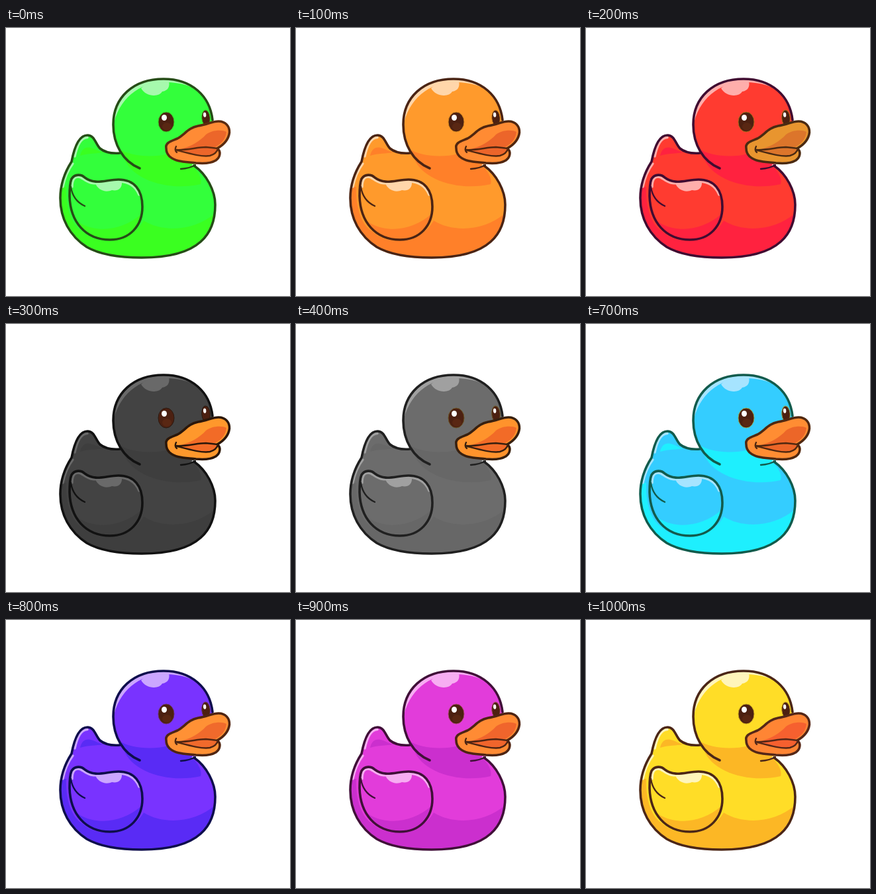
Animation of 429x405 px, one loop 1.1 s. Source, as an HTML page without scripts:

```html
<!DOCTYPE html>
<html lang="en">
<head>
<meta charset="utf-8">
<title>Colour-changing duck</title>
<style>
html, body { margin: 0; width: 100%; height: 100%; overflow: hidden; background: #fff; }
svg { display: block; width: 429px; height: 405px; animation: dye 1.1s step-end infinite; }

/* main, shade, gloss, outline; beak, mouth, beak outline; eye fringe */
@keyframes dye {
  0%     { --main: #33ff3b; --shade: #3aff20; --gloss: #a6f9ad; --line: #264c17; --beak: #ff8b35; --mouth: #ec662a; --lip: #5a2b10; --fringe: #3cc425; }
  9.09%  { --main: #ff9a2c; --shade: #ff8029; --gloss: #ffd6aa; --line: #4a2414; --beak: #ff8b33; --mouth: #ec652a; --lip: #50260f; --fringe: #d88a20; }
  18.18% { --main: #ff3b30; --shade: #ff223f; --gloss: #ffaeab; --line: #400c31; --beak: #e8952f; --mouth: #dc752b; --lip: #4a2a12; --fringe: #a86c18; }
  27.27% { --main: #434343; --shade: #3e3e3e; --gloss: #696969; --line: #121212; --beak: #ff982c; --mouth: #f26b27; --lip: #2b170a; --fringe: #2b1a10; }
  36.36% { --main: #6c6c6c; --shade: #676767; --gloss: #a0a0a0; --line: #202020; --beak: #ff932c; --mouth: #f26b27; --lip: #38200f; --fringe: #6b5426; }
  45.45% { --main: #999; --shade: #929292; --gloss: #d9d9d9; --line: #2e2e2e; --beak: #ff8f2b; --mouth: #f26b27; --lip: #482410; --fringe: #b89436; }
  54.54% { --main: #62b4cc; --shade: #58bec9; --gloss: #bcdfec; --line: #1f443e; --beak: #ff8f2f; --mouth: #f06827; --lip: #4c2610; --fringe: #a69a46; }
  63.63% { --main: #34cdff; --shade: #1eeffe; --gloss: #a6e4ff; --line: #125b4c; --beak: #ff8d33; --mouth: #ec6628; --lip: #502810; --fringe: #98a249; }
  72.72% { --main: #7933ff; --shade: #592bf5; --gloss: #cba6ff; --line: #0e0e4c; --beak: #ff9135; --mouth: #f06a2c; --lip: #4f2512; --fringe: #67345f; }
  81.81% { --main: #e23cda; --shade: #cb2fce; --gloss: #f7adf2; --line: #401038; --beak: #ff8b34; --mouth: #f0652c; --lip: #4d2413; --fringe: #b04a70; }
  90.9%  { --main: #ffdd27; --shade: #fcb725; --gloss: #fff5bb; --line: #4b2617; --beak: #ff8534; --mouth: #f6602f; --lip: #542718; --fringe: #c6a221; }
}

.main { fill: var(--main); }
.shade { fill: var(--shade); }
.gloss { fill: var(--gloss); }
.line, .rim, .crease { fill: none; stroke-linecap: round; stroke-linejoin: round; }
.line { stroke: var(--line); stroke-width: 3.6; }
.crease { stroke: var(--line); stroke-width: 2.3; }
.rim { stroke: var(--gloss); stroke-width: 3.4; }
.beak { fill: var(--beak); stroke: var(--lip); stroke-width: 3.6; stroke-linejoin: round; }
.mouth { fill: var(--mouth); }
.lip { fill: none; stroke: var(--lip); stroke-width: 2.4; stroke-linecap: round; stroke-linejoin: round; }
.eye { fill: #4c2011; stroke: var(--fringe); stroke-width: 1; }
.iris { fill: #592713; }
.glint { fill: #fff; }
</style>
</head>
<body>
<svg viewBox="0 0 429 405" role="img" aria-label="Rubber duck changing colour">
  <defs>
    <path id="body" d="M172 189C159 190 148 187 142 182C135 175 134 162 123 162C110 162 103 181 99 202C90 216 82 233 82 257C82 288 96 314 122 331C143 343 174 347 205 347C241 347 274 341 294 323C309 310 316 290 316 267C316 246 303 221 284 208"/>
    <path id="head" d="M202 212C177 202 162 176 162 146C162 105 192 77 238 77C281 77 308 103 312 139"/>
    <path id="wing" d="M119 226C114 221 104 220 99 228C96 235 96 244 96 254C97 293 120 320 157 320C187 320 206 299 206 270C206 245 194 229 170 229C151 229 135 238 119 226Z"/>
    <clipPath id="inBody"><use href="#body"/></clipPath>
    <clipPath id="inWing"><use href="#wing"/></clipPath>
  </defs>

  <use href="#body" class="main"/>
  <g clip-path="url(#inBody)" class="shade">
    <path d="M80 240H91C90 270 98 298 116 308C140 330 188 326 208 291C236 309 286 308 318 278V350H80Z"/>
    <path d="M178 196C190 230 246 247 294 236C297 226 288 214 278 205Z"/>
    <path d="M112 193C114 183 120 179 128 181C136 183 141 187 147 188C136 190 125 189 112 193Z"/>
  </g>
  <path class="rim" d="M104 194C107 180 113 165.500 123 165.500M86 240C89 225 95 213 101 205"/>
  <use href="#body" class="line"/>

  <path class="main" d="M202 212C177 202 162 176 162 146C162 105 192 77 238 77C281 77 308 103 312 139L316 170L284 206L250 200Z"/>
  <path class="shade" d="M171 183C188 193 218 197 246 190L286 204L270 213H202C188 206 178 196 171 183Z"/>
  <path class="gloss" d="M162 148C162 105 192 77 238 77C265 77 285 86 297 100C283 88 265 82 240 82C200 82 170 108 162 148Z"/>
  <path class="gloss" d="M204 91C214 81 232 78 246 81C248 89 244 95 236 96C231 105 211 104 204 91Z"/>
  <use href="#head" class="line"/>
  <path class="crease" d="M264 213Q278 212 286 207"/>

  <use href="#wing" class="main"/>
  <path class="shade" clip-path="url(#inWing)" d="M94 276C106 304 164 320 208 278V324H94Z"/>
  <path class="rim" d="M100 240C100 230 103 225 109 225C115 225 119 232 128 234C144 237 156 232 170 232C186 232 196 240 201 252"/>
  <path class="gloss" d="M134 233C148 236 159 231 175 232C176 243 168 247 160 245C151 249 139 246 134 233Z"/>
  <use href="#wing" class="line"/>
  <path class="crease" d="M98 240C100 254 108 264 119 269"/>

  <ellipse class="eye" cx="242" cy="142" rx="12" ry="15"/>
  <ellipse class="iris" cx="243" cy="149" rx="7" ry="6"/>
  <ellipse class="glint" cx="239" cy="135.500" rx="4" ry="4.600"/>
  <g transform="rotate(-4 302 136)">
    <ellipse class="eye" cx="302" cy="136" rx="6.300" ry="12"/>
    <ellipse class="glint" cx="300.500" cy="131" rx="2.200" ry="3.600"/>
  </g>

  <path class="beak" d="M242 182C240 173 250 171 259 167C270 161 275 151 290 148C304 146 311 141 321 141C332 141 338 149 337.500 158C336 170 328 177 319 182C325 186 324 195 317 200C309 205 298 205 287 204C272 202 257 203 247 194C243 190 242 186 242 182Z"/>
  <path class="mouth" d="M264 183C280 179 293 171 302 161C311 154 326 153 333 157C332 168 325 175 316 180C298 179 280 185 264 183Z"/>
  <path class="mouth" d="M262 185C278 185 290 180 303 180L320 182C319 187 315 191 308 193C296 195 278 190 262 185Z"/>
  <path class="lip" d="M257 179Q254 184 258 188M257 184C274 185 288 180 302 180Q312 181 320 182C319 187 315 191 308 193C296 195 278 190 259 185"/>
</svg>
</body>
</html>
```
